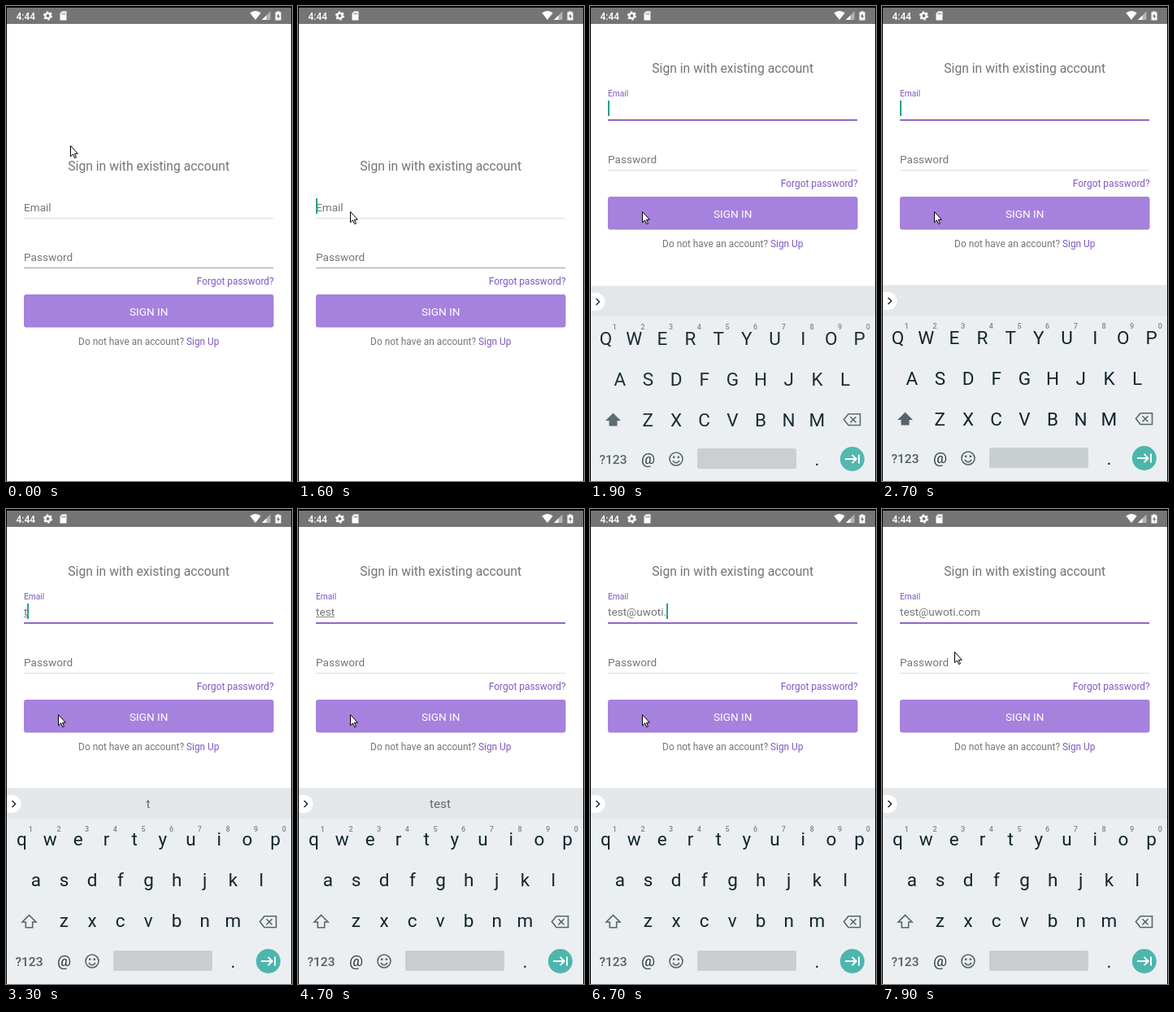
These frames come from a looping animation (352x583 px, 8 s). An HTML page:

```html
<!DOCTYPE html>
<html lang="en">
<head>
<meta charset="utf-8">
<title>Sign in</title>
<style>
  html, body { margin: 0; width: 100%; height: 100%; overflow: hidden; background: #000; }
  svg { display: block; width: 352px; height: 583px; font-family: Roboto, sans-serif; }
  text { white-space: pre; }
  .mid { text-anchor: middle; }
  .end { text-anchor: end; }
  .gray { fill: #757575; }
  .link { fill: #7e57c2; }
  .field { font-size: 13.6px; }
  .small { font-size: 11.9px; }
  .key { font-size: 22.5px; fill: #10252d; text-anchor: middle; }
  .hint { font-size: 9px; font-weight: 500; fill: #78848a; text-anchor: middle; }
  .icon { fill: none; stroke: #56656c; stroke-width: 1.6; }
</style>
</head>
<body>
<svg viewBox="0 0 352 583">
  <rect x="1" y="2" width="350" height="581" fill="#fff"/>

  <g id="form">
    <text class="mid gray" x="175.7" y="202" font-size="15.7">Sign in with existing account</text>
    <text id="label" x="22"  y="251.5">Email</text>
    <text id="typed" class="field gray" x="22" y="251"></text>
    <rect id="compose" x="22" y="252" height="1" fill="#8a8a8a"/>
    <rect id="emailLine" x="22" width="307"/>
    <rect id="caret" y="236" width="2" height="19" fill="#2a9d8a"/>
    <text class="field gray" x="22" y="313">Password</text>
    <rect id="passLine" x="22" y="321" width="307" height="1"/>
    <text class="small link end" x="329.7" y="342">Forgot password?</text>
    <rect x="22" y="354" width="307.5" height="40.5" rx="3" fill="#a681de"/>
    <text class="field mid" x="175.7" y="380" fill="#fff">SIGN IN</text>
    <text class="small gray mid" x="175.8" y="416">Do not have an account? <tspan class="link">Sign Up</tspan></text>
  </g>

  <g id="board">
    <rect x="1" y="342" width="350" height="1" fill="#f1f3f4"/>
    <rect x="1" y="343" width="350" height="37" fill="#e3e7e9"/>
    <rect x="1" y="380" width="350" height="260" fill="#eceff1"/>
    <path d="M1 351H7.500A10.500 10.500 0 0 1 7.500 373H1Z" fill="#fff"/>
    <path d="M7.500 358L11.500 362L7.500 366" fill="none" stroke="#263238" stroke-width="1.600"/>
    <text id="suggest" class="mid" x="175" y="367" font-size="15.300" fill="#5f6b70"></text>
    <g id="hints"></g>
    <g id="upper">
      <path d="M28.500 498.500L38 508H33.500V514.500H23.500V508H19Z" fill="#56656c"/>
    </g>
    <g id="lower">
      <path class="icon" d="M28.500 498.500L37 507H32.700V513.800H24.300V507H20Z"/>
    </g>
    <path class="icon" d="M312.500 506.500L318 499.800H332.500V513.500H318ZM320.500 503.200L327.500 510.200M327.500 503.200L320.500 510.200"/>
    <text class="mid" x="28.500" y="560.500" font-size="15.500" font-weight="500" fill="#4f5e65">?123</text>
    <text class="mid" x="71.500" y="560.500" font-size="19" fill="#22353d">@</text>
    <circle class="icon" cx="106" cy="555" r="8"/>
    <path class="icon" d="M101.800 557Q106 562.500 110.200 557"/>
    <path d="M102 551.500h2.400v2.400h-2.400zM107.600 551.500h2.400v2.400h-2.400z" fill="#56656c"/>
    <rect x="132" y="542" width="122" height="25" rx="2.500" fill="#c9ced1"/>
    <text class="key" x="279.500" y="563">.</text>
    <circle cx="322.800" cy="555" r="15" fill="#4db6ac"/>
    <path d="M314 555H327.500M322.500 549.800L327.700 555L322.500 560.200M331 549.500V560.500" fill="none" stroke="#fff" stroke-width="1.900"/>
  </g>

  <rect x="1" y="2" width="350" height="20" fill="#757575"/>
  <g fill="#fff">
    <text x="12.500" y="16.500" font-size="12" font-weight="500">4:44</text>
    <circle cx="51.500" cy="12" r="3.100" fill="none" stroke="#fff" stroke-width="2.400"/>
    <circle cx="51.500" cy="12" r="4.700" fill="none" stroke="#fff" stroke-width="1.800" stroke-dasharray="2.460"/>
    <path d="M69 6.500H74.500V17.500H66.500V9Z"/>
    <path d="M69 8.500v2M70.800 8.500v2M72.600 8.500v2" stroke="#757575"/>
    <path d="M300.300 8.500Q307 3.500 313.700 8.500L307 17Z"/>
    <path d="M325.500 6.500V17H315Z" opacity=".45"/>
    <path d="M320.500 11.500V17H315Z"/>
    <path d="M333.500 6.500H336.500V7.500H338.500V17.500H331.500V7.500H333.500Z"/>
    <path d="M335.600 9L333 13H334.700V16L337.200 12H335.600Z" fill="#757575"/>
  </g>
  <rect width="1" height="583"/>
  <rect x="351" width="1" height="583"/>

  <path id="mouse" d="M.5 .5V13.700L3.500 10.900L5.600 15.600L7.500 14.800L5.400 10.200H9.400Z" fill="#fff" stroke="#000"/>
</svg>

<script>
const LOOP = 8000;
const EMAIL = 'test@uwoti.com';
const KEY_TIMES = [3300, 3500, 4100, 4200, 5000, 5700, 6000, 6100, 6200, 6300, 6700, 6900, 7000, 7100];
const CARET_OFF = [[0, 1600], [2200, 2700], [3200, 3300], [4000, 4100], [4700, 5000], [5600, 5700], [7600, LOOP]];
const ROWS = [['qwertyuiop', 19.5], ['asdfghjkl', 36.8], ['zxcvbnm', 71.3]];
const PITCH = 34.67;

const $ = id => document.getElementById(id);
const set = (id, attrs) => {
  for (const name in attrs) $(id).setAttribute(name, attrs[name]);
};
const show = (id, on) => set(id, { visibility: on ? 'visible' : 'hidden' });

function addText(parent, cls, x, y, str) {
  const el = document.createElementNS($(parent).namespaceURI, 'text');
  el.setAttribute('class', cls);
  el.setAttribute('x', x);
  el.setAttribute('y', y);
  el.textContent = str;
  $(parent).append(el);
}

ROWS.forEach(([letters, left], row) => {
  [...letters].forEach((ch, i) => {
    const x = left + i * PITCH;
    addText('lower', 'key', x, 412.5 + row * 50.3, ch);
    addText('upper', 'key', x, 414.5 + row * 50, ch.toUpperCase());
    if (row === 0) addText('hints', 'hint', x + 10.8, 396, (i + 1) % 10);
  });
});

// progress of a move that advances every 100 ms, first step at `start`
const steps = (t, start, n) =>
  Math.min(Math.max(Math.floor((t - start) / 100) + 1, 0), n) / n;
const smooth = p => p * p * (3 - 2 * p);
const mix = (a, b, p) => a + (b - a) * p;

function mousePos(t) {
  if (t >= 7800) {
    const p = steps(t, 7800, 2);
    return [mix(64, 89, p), mix(252, 175, p)];
  }
  const p = smooth(steps(t, 800, 7));
  return [mix(79, 64, p), mix(171, 252, p)];
}

function draw(t) {
  const focused = t >= 1800;
  const floating = focused ? (t < 1900 ? 0.5 : 1) : 0;
  const count = KEY_TIMES.filter(k => t >= k).length;
  const composing = count > 0 && count < 5;
  const [mx, my] = mousePos(t);

  set('mouse', { transform: `translate(${mx} ${my})` });
  set('form', { transform: `translate(0 ${focused ? -120 : 0})` });
  set('label', {
    y: mix(251.5, 231, floating),
    'font-size': mix(13.6, 10.2, floating),
    fill: focused ? '#7e57c2' : '#757575'
  });
  set('emailLine', {
    y: focused ? 259 : 260,
    height: focused ? 2 : 1,
    fill: focused ? '#8f68cb' : '#dedede'
  });
  set('passLine', { fill: focused ? '#dedede' : '#9c9c9c' });

  $('typed').textContent = EMAIL.slice(0, count);
  const width = count ? $('typed').getComputedTextLength() : 0;
  set('caret', { x: Math.floor(22 + width) });
  show('caret', !CARET_OFF.some(([a, b]) => t >= a && t < b));
  set('compose', { width });
  show('compose', composing);
  $('suggest').textContent = composing ? EMAIL.slice(0, count) : '';

  const drop = t < 1900 ? 45 : t < 2000 ? 1 : 0;
  set('board', {
    transform: `translate(0 ${drop})`,
    opacity: t < 1800 ? 0 : t < 1900 ? 0.5 : t < 2000 ? 0.96 : 1
  });
  show('upper', count === 0);
  show('lower', count > 0);
}

function tick() {
  draw(performance.now() % LOOP);
  requestAnimationFrame(tick);
}
tick();
</script>
</body>
</html>
```
